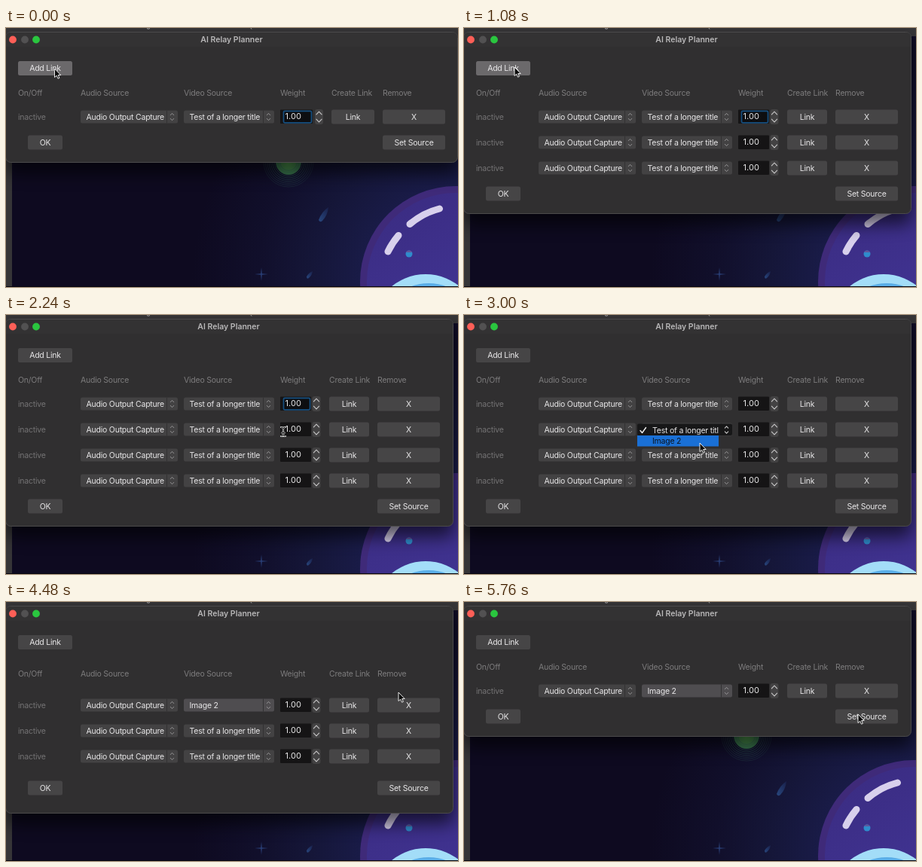
These frames come from a looping animation (600 px wide and 344 px high, 5.8 s). An HTML page:

```html
<!DOCTYPE html>
<html lang="en">
<head>
<meta charset="utf-8">
<title>Link panel</title>
<style>
  html, body { margin: 0; width: 100%; height: 100%; overflow: hidden; background: #0e0a20; }
  svg { display: block; width: 600px; height: 344px; }
  text { font: 10.5px Inter, "Liberation Sans", sans-serif; letter-spacing: -.22px; fill: #e8e7e8; }
  .mid { text-anchor: middle; }
  .title { font-weight: 600; fill: #b9b8b9; letter-spacing: 0; }
  .head { fill: #7d7c7d; }
  .off { fill: #747374; }
  .num { font-size: 11px; letter-spacing: .1px; }
  .dark { fill: #0c1420; }
  .mark { fill: none; stroke: #c9c8c9; stroke-width: 1.1; stroke-linecap: round; stroke-linejoin: round; }
  .dim { stroke: #a09fa0; stroke-width: .9; }
  .tick { fill: none; stroke: #f0f0f0; stroke-width: 1.4; stroke-linecap: round; stroke-linejoin: round; }
</style>
</head>
<body>
<svg viewBox="0 0 600 344">
  <defs>
    <radialGradient id="sky" gradientUnits="userSpaceOnUse" cx="597" cy="337" r="350">
      <stop offset=".36" stop-color="#191b47"/>
      <stop offset=".55" stop-color="#151638"/>
      <stop offset=".75" stop-color="#110f2b"/>
      <stop offset="1" stop-color="#0e0a20"/>
    </radialGradient>
    <linearGradient id="body" x1="0" y1="0" x2=".6" y2="1">
      <stop offset="0" stop-color="#3a2b80"/>
      <stop offset="1" stop-color="#43379a"/>
    </linearGradient>
    <radialGradient id="moss">
      <stop offset="0" stop-color="#559f50"/>
      <stop offset="1" stop-color="#39794a"/>
    </radialGradient>
    <linearGradient id="tail" x1="0" y1="1" x2="1" y2="0">
      <stop offset="0" stop-color="#28487f"/>
      <stop offset="1" stop-color="#191f49"/>
    </linearGradient>
    <filter id="soft" x="-10%" y="-15%" width="120%" height="140%">
      <feGaussianBlur stdDeviation="11"/>
    </filter>
    <clipPath id="menuText"><rect x="230" y="144" width="108" height="32"/></clipPath>
  </defs>

  <rect width="600" height="344" fill="#363537"/>
  <rect x="8" y="11" width="592" height="333" fill="url(#sky)"/>
  <path d="M187 .5q2 1.500 4 0M325 0l1 1.500" stroke="#a5a4a5" fill="none"/>

  <g id="moon"></g>
  <g fill="url(#tail)">
    <path d="M415 255q4-11 13-17-1 11-8 18-3 3-5-1z"/>
    <path d="M399 330q3-5 8-7-1 6-5 9-3 2-3-2z"/>
  </g>
  <path d="M339 318l.8 8.200 8.200.8-8.200.8-.8 8.200-.8-8.200-8.200-.8 8.200-.8z" fill="#2b4078"/>

  <circle cx="597" cy="337" r="127" fill="#3f2a79"/>
  <circle cx="597" cy="337" r="118" fill="url(#body)"/>
  <g fill="none" stroke="#d8d0ec" stroke-width="9" stroke-linecap="round">
    <path d="M507 297A98.500 98.500 0 0 1 521 275.500"/>
    <path d="M536 260.500A98.500 98.500 0 0 1 575.500 240"/>
  </g>
  <circle cx="535" cy="300" r="4.500" fill="#2f8ccc"/>
  <path d="M531 298a4.500 4.500 0 0 1 8 0z" fill="#5f569c"/>
  <circle cx="557" cy="398" r="71" fill="#a3ddf8"/>
  <circle cx="561" cy="405" r="66" fill="#5aaee8"/>
  <rect y="343" width="600" height="1" fill="#08060f"/>

  <g id="win"></g>
  <g id="cursor">
    <path id="arrow" d="M0 0V11.500L2.700 9.200 4.500 13.200 6.400 12.400 4.700 8.500H8.200Z"
          fill="#0a0a0a" stroke="#fff" stroke-width=".9" stroke-linejoin="round"/>
    <g id="beam" fill="none" stroke-linecap="round">
      <path d="M-3-6Q0-6 0-4 0-6 3-6M0-4V4M-3 6Q0 6 0 4 0 6 3 6M-1.500 1.500h3" stroke="#fff" stroke-width="2.200"/>
      <path d="M-3-6Q0-6 0-4 0-6 3-6M0-4V4M-3 6Q0 6 0 4 0 6 3 6M-1.500 1.500h3" stroke="#111" stroke-width="1"/>
    </g>
  </g>
</svg>
<script>
const LOOP = 5800, TICK = 40, PITCH = 34;
const $ = id => document.getElementById(id);

// time, video choice per row, rows the window is tall enough for
const steps = [
  [0, 'A', 1], [320, 'AA', 2], [880, 'AAA', 3], [1480, 'AAAA', 4],
  [3160, 'ABAA', 4], [4440, 'BAA', 4], [4560, 'BAA', 3],
  [5000, 'BA', 3], [5120, 'BA', 2], [5560, 'B', 2], [5640, 'B', 1]
];
const videos = { A: 'Test of a longer title', B: 'Image 2' };

// time, x, y of the pointer
const path = [
  [0, 64.5, 54], [1080, 67, 52], [1760, 67, 52], [2200, 368, 155], [2280, 368, 155],
  [2560, 328, 153], [2680, 328, 153], [2960, 313, 170], [3240, 313, 170],
  [3960, 502.5, 130], [4040, 502.5, 130], [4320, 521, 120], [4480, 521, 120],
  [4800, 522, 154], [5580, 522, 154], [5740, 523, 149], [LOOP, 523, 149]
];

const rect = (x, y, w, h, fill, r = 2.5, more = '') =>
  `<rect x="${x}" y="${y}" width="${w}" height="${h}" rx="${r}" fill="${fill}" ${more}/>`;
const text = (x, y, s, cls = '') => `<text x="${x}" y="${y + 3.8}" class="${cls}">${s}</text>`;
const button = (x, y, w, s, fill = '#464546') =>
  rect(x, y - 9.5, w, 19, fill) + text(x + w / 2, y, s, 'mid');
const chevrons = (x, y, w, gap, cls = '') =>
  `<path class="mark ${cls}" d="M${x - w} ${y - gap}l${w}-${w} ${w} ${w}M${x - w} ${y + gap}l${w} ${w} ${w}-${w}"/>`;

function combo(x, y, w, s, fill = '#434243') {
  return rect(x, y - 8.5, w, 17, fill) +
    rect(x + w - 15, y - 8.5, 1, 17, '#323132', 0) +
    text(x + 7.5, y, s) + chevrons(x + w - 7.5, y, 2.2, 2.4, 'dim');
}

function spin(y, wide, focus) {
  const w = wide ? 43 : 41, x = wide ? 415.5 : 412;
  return rect(364, y - 9.5, w, 18.5, '#151415', 1) +
    (focus ? rect(368.5, y - 7.7, w - 6, 15.5, '#0d0e11', 1.5, 'stroke="#164f80" stroke-width="1.7"') : '') +
    text(370.5, y - 1, '1.00', 'num') +
    rect(x - 5.5, y - 10, 11, 20, '#434243', 3) + chevrons(x, y, 3.6, 3.2);
}

function row(y, kind, wide, focus) {
  return text(16, y, 'inactive', 'off') +
    combo(99, y, 129, 'Audio Output Capture') +
    combo(236, y, 120, videos[kind], kind === 'B' ? '#4f4d50' : undefined) +
    spin(y, wide, focus) +
    button(wide ? 432 : 429, y, wide ? 57 : 53, 'Link') +
    button(wide ? 500 : 493, y, 83, 'X');
}

function menu() {
  return rect(230, 144.5, 126, 15.5, '#171718', 2) + rect(230, 160, 108, 14.5, '#1a70d6', 0) +
    '<path class="tick" d="M234 153.500l2.500 3 5-7"/>' + chevrons(348.5, 152.5, 2.2, 2.4) +
    `<g clip-path="url(#menuText)">${text(250, 153, videos.A)}${text(250, 167.5, videos.B, 'dark')}</g>`;
}

function panel({ kinds, slots, wide, open, focus, lit }) {
  const right = wide ? 600 : 594, bottom = 145 + PITCH * slots;
  const slack = slots > kinds.length;
  const headY = slack ? 95 : 86, rowY = slack ? 137 : 118;
  const footY = 118 + PITCH * slots - (slack ? 7 : 0);
  const heads = [[16, 'On/Off'], [99, 'Audio Source'], [236, 'Video Source'], [364, 'Weight'],
    [wide ? 432 : 429, 'Create Link'], [wide ? 500 : 493, 'Remove']];
  const lights = [[9, '#fe5f57'], [25, '#525152'], [40, '#2ac63f']];
  return rect(0, 18, right, bottom - 4, '#000', 8, 'opacity=".6" filter="url(#soft)"') +
    rect(-.5, 5.5, right, bottom - 6, '#302f30', 7, 'stroke="#4b4a4b"') +
    `<path d="M0 25V12q0-6 6-6H${right - 7}q6 0 6 6V25z" fill="#333233"/>` +
    lights.map(([x, c]) => `<circle cx="${x}" cy="15.500" r="4.900" fill="${c}"/>`).join('') +
    text(wide ? 299.5 : 295.5, 15, 'AI Relay Planner', 'mid title') +
    button(16, 53.5, 72, 'Add Link', lit ? '#6b696b' : undefined) +
    heads.map(([x, s]) => text(x, headY, s, 'head')).join('') +
    [...kinds].map((k, i) => row(rowY + PITCH * i, k, wide, focus && !i)).join('') +
    button(29, footY, 46, 'OK') + button(wide ? 500 : 493, footY, 83, 'Set Source') +
    (open ? menu() : '');
}

function pointer(t) {
  const i = path.findIndex(p => p[0] > t);
  const [t0, x0, y0] = path[i - 1], [t1, x1, y1] = path[i];
  const k = (t - t0) / (t1 - t0), e = k * k * (3 - 2 * k);
  return [x0 + (x1 - x0) * e, y0 + (y1 - y0) * e];
}

function drawMoon() {
  let s = '<circle cx="375" cy="178" r="17" fill="url(#moss)"/>';
  for (let r = 33; r > 10; r -= 2.4)
    s += `<circle cx="375" cy="178" r="${r}" fill="none" stroke="#35665c" stroke-opacity="${.95 - r / 45}"/>`;
  $('moon').innerHTML = s;
}

let shown = '';
function frame(now) {
  const t = Math.floor(now % LOOP / TICK) * TICK;
  const [, kinds, slots] = steps.filter(s => s[0] <= t).pop();
  const open = t >= 2640 && t < 3160;
  const state = { kinds, slots, wide: t < 320, open, focus: !open && t < 4440, lit: t < 1840 };
  const key = JSON.stringify(state);
  if (key !== shown) {
    $('win').innerHTML = panel(state);
    shown = key;
  }
  const [x, y] = pointer(t);
  const typing = t < 3000 && x > 362 && x < 406 && y > 108;
  $('cursor').setAttribute('transform', `translate(${x.toFixed(2)} ${y.toFixed(2)})`);
  $('beam').setAttribute('visibility', typing ? 'visible' : 'hidden');
  $('arrow').setAttribute('visibility', typing ? 'hidden' : 'visible');
  requestAnimationFrame(() => frame(performance.now() - start));
}

drawMoon();
const start = performance.now();
frame(0);
</script>
</body>
</html>
```
